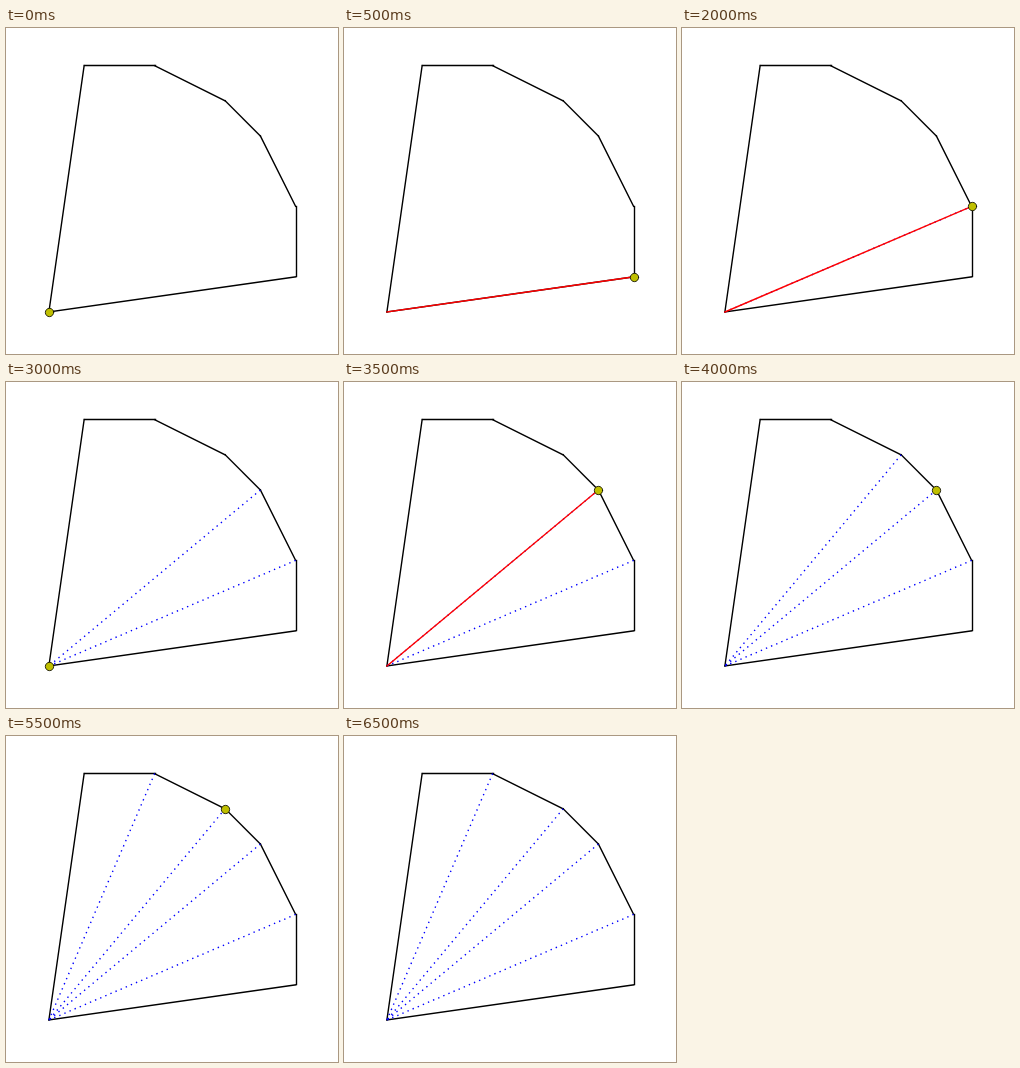
Animation, 332 px wide and 326 px high, one loop 7000 ms. Source, as an HTML page with a canvas:

```html
<!DOCTYPE html>
<html lang="en">
<head>
<meta charset="utf-8">
<title>Fan triangulation</title>
<style>
  html, body { margin: 0; width: 100%; height: 100%; overflow: hidden; background: #fff; }
  canvas { display: block; }
</style>
</head>
<body>
<canvas id="stage" width="332" height="326"></canvas>
<script>
const ctx = document.getElementById('stage').getContext('2d');
const STEP = 500, STEPS = 14, LINE = 1.39;

// Polygon corners in grid units, counted from the lower left corner.
const grid = [[0, 0], [7, 1], [7, 3], [6, 5], [5, 6], [3, 7], [1, 7]];
const points = grid.map(([i, j]) => [42.9 + 35.25 * i, 284 - 35.2 * j]);

function line([x1, y1], [x2, y2], color, dash = [], cap = 'butt') {
  ctx.strokeStyle = color;
  ctx.lineWidth = LINE;
  ctx.lineCap = cap;
  ctx.setLineDash(dash);
  ctx.beginPath();
  ctx.moveTo(x1, y1);
  ctx.lineTo(x2, y2);
  ctx.stroke();
}

// Upright and level edges sit on pixel centres to stay crisp.
function edge(a, b) {
  const straight = Math.abs(a[0] - b[0]) < 0.01 || Math.abs(a[1] - b[1]) < 0.01;
  const snap = ([x, y]) => [Math.round(x) + 0.5, Math.floor(y) + 0.5];
  line(straight ? snap(a) : a, straight ? snap(b) : b, '#000', [], 'square');
}

function marker([x, y]) {
  ctx.setLineDash([]);
  ctx.beginPath();
  ctx.arc(Math.round(x) + 0.5, Math.round(y) + 0.5, 4.17, 0, Math.PI * 2);
  ctx.fillStyle = '#bfbf00';
  ctx.fill();
  ctx.strokeStyle = '#000';
  ctx.lineWidth = 0.8;
  ctx.stroke();
}

// Each round: mark the apex, test a ray to the next corner, add a diagonal.
function draw(step) {
  const round = Math.floor(step / 3);
  const phase = step % 3;
  const done = step === STEPS - 1;
  const corner = round + 1;
  const diagonals = Math.min(4, round + (phase === 2 ? 1 : 0));

  ctx.fillStyle = '#fff';
  ctx.fillRect(0, 0, 332, 326);
  points.forEach((p, i) => edge(p, points[(i + 1) % points.length]));
  for (let i = 0; i < diagonals; i++) {
    line(points[i + 2], points[0], '#00f', [LINE, LINE * 3]);
  }
  if (done) return;
  if (phase === 1) line(points[0], points[corner], '#f00', [], 'square');
  marker(points[phase === 0 ? 0 : corner]);
}

function tick() {
  draw(Math.floor(performance.now() / STEP) % STEPS);
  requestAnimationFrame(tick);
}
tick();
</script>
</body>
</html>
```
